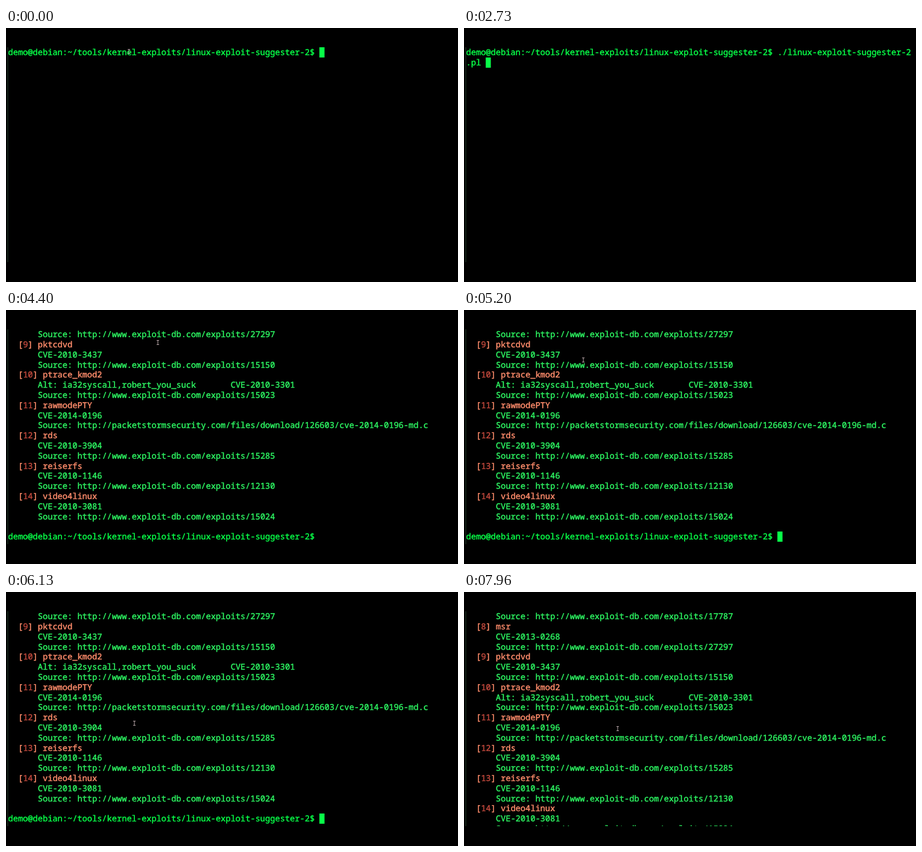
An HTML page with a canvas that plays this animation: 750x422 px, repeating every 8000 ms.

```html
<!DOCTYPE html>
<html lang="en">
<head>
<meta charset="utf-8">
<title>Terminal</title>
<style>
  html, body { margin: 0; width: 100%; height: 100%; overflow: hidden; background: #000; }
  canvas { display: block; width: 750px; height: 422px; }
</style>
</head>
<body>
<canvas id="stage" width="750" height="422"></canvas>
<script>
const ctx = document.getElementById('stage').getContext('2d');
const LOOP = 8000, LEFT = 3.5, TOP = 32.2, COL = 8.213, ROW = 16.8;
const BRIGHT = '#08ff48', GREEN = '#2df562', SALMON = '#ff8d6c', RED = '#c0483c';

const PROMPT = 'demo@debian:~/tools/kernel-exploits/linux-exploit-suggester-2$ ';
const COMMAND = './linux-exploit-suggester-2.pl ';
const WIDTH = 90;
const DB = 'http://www.exploit-db.com/exploits/';

const KEYS = [1660, 1810, 1950, 2070, 2200];
const TAB = 2460, ENTER = 3400, WHEEL = 7740, BLINK = 600;

const entry = (id, name, cve, source) => [
  { id, name },
  { text: cve },
  { text: 'Source: ' + source }
];

const output = [
  { text: 'Source: ' + DB + '17787' },
  ...entry(8, 'msr', 'CVE-2013-0268', DB + '27297'),
  ...entry(9, 'pktcdvd', 'CVE-2010-3437', DB + '15150'),
  ...entry(10, 'ptrace_kmod2', 'Alt: ia32syscall,robert_you_suck       CVE-2010-3301', DB + '15023'),
  ...entry(11, 'rawmodePTY', 'CVE-2014-0196',
    'http://packetstormsecurity.com/files/download/126603/cve-2014-0196-md.c'),
  ...entry(12, 'rds', 'CVE-2010-3904', DB + '15285'),
  ...entry(13, 'reiserfs', 'CVE-2010-1146', DB + '12130'),
  ...entry(14, 'video4linux', 'CVE-2010-3081', DB + '15024')
];

// Mouse paths: [time, x, y]
const paths = [
  [[0, 204, 39], [30, 204, 39], [260, 257, 53], [KEYS[0], 257, 53]],
  [[4400, 252, 54], [4750, 214, 62], [5200, 198, 83], [5700, 204, 160],
   [6130, 213, 218], [6800, 238, 225], [7560, 255, 227], [LOOP, 255, 227]]
];

// A thin outline gives the regular face a medium weight.
function write(text, col, row, color) {
  const x = LEFT + col * COL, y = TOP + row * ROW + 12.9;
  ctx.fillStyle = ctx.strokeStyle = color;
  ctx.fillText(text, x, y);
  ctx.strokeText(text, x, y);
}

function block(col, row) {
  ctx.fillStyle = BRIGHT;
  ctx.fillRect(Math.floor(LEFT + col * COL), Math.round(TOP + row * ROW), 8.5, 17);
}

function drawEntry(line, row) {
  if (line.text) {
    write(line.text, 6, row, GREEN);
    return;
  }
  const id = String(line.id);
  write('[', 2, row, SALMON);
  write(id, 3, row, RED);
  write(']', 3 + id.length, row, SALMON);
  write(line.name, 5 + id.length, row, SALMON);
}

function cursorOn(t) {
  const blink = since => Math.floor((t - since) / BLINK) % 2 === 0;
  if (t < KEYS[0]) return blink(-570);
  if (t >= ENTER) return blink(ENTER + 30);
  return blink(t >= TAB ? TAB : KEYS.filter(k => k <= t).pop());
}

function drawShell(t) {
  const count = t >= TAB ? COMMAND.length : KEYS.filter(k => k <= t).length;
  const line = PROMPT + COMMAND.slice(0, count);
  write(line.slice(0, WIDTH), 0, 0, BRIGHT);
  write(line.slice(WIDTH), 0, 1, BRIGHT);
  if (cursorOn(t)) block(line.length % WIDTH, Math.floor(line.length / WIDTH));
}

function drawOutput(t) {
  const scroll = t < WHEEL ? 3 : 0;
  output.forEach((line, i) => {
    if (i >= scroll) drawEntry(line, i - scroll);
  });
  const row = output.length + 1 - scroll;
  write(PROMPT, 0, row, BRIGHT);
  if (cursorOn(t)) block(PROMPT.length, row);
}

function drawPointer(t) {
  const path = paths.find(p => t >= p[0][0] && t < p[p.length - 1][0]);
  if (!path) return;
  const i = path.findIndex(p => p[0] > t);
  const [t0, x0, y0] = path[i - 1], [t1, x1, y1] = path[i];
  const k = (t - t0) / (t1 - t0);
  const x = Math.round(x0 + (x1 - x0) * k), y = Math.round(y0 + (y1 - y0) * k);
  ctx.fillStyle = '#b5a3a6';
  ctx.fillRect(x - 0.5, y - 3, 1, 6);
  ctx.fillRect(x - 2, y - 4, 4, 1);
  ctx.fillRect(x - 2, y + 3, 4, 1);
}

function draw(t) {
  ctx.fillStyle = '#000';
  ctx.fillRect(0, 0, 750, 422);
  ctx.fillStyle = '#122016';
  ctx.fillRect(2, 32, 2, 357);
  ctx.save();
  ctx.beginPath();
  ctx.rect(0, 32, 750, 357);
  ctx.clip();
  if (t < ENTER) drawShell(t);
  else drawOutput(t);
  drawPointer(t);
  ctx.restore();
}

ctx.font = `${COL / 0.6}px "Noto Sans Mono", "DejaVu Sans Mono", monospace`;
ctx.textRendering = 'geometricPrecision';
ctx.lineWidth = 0.45;
ctx.lineJoin = 'round';
const start = performance.now();
function tick() {
  draw((performance.now() - start) % LOOP);
  requestAnimationFrame(tick);
}
tick();
</script>
</body>
</html>
```
